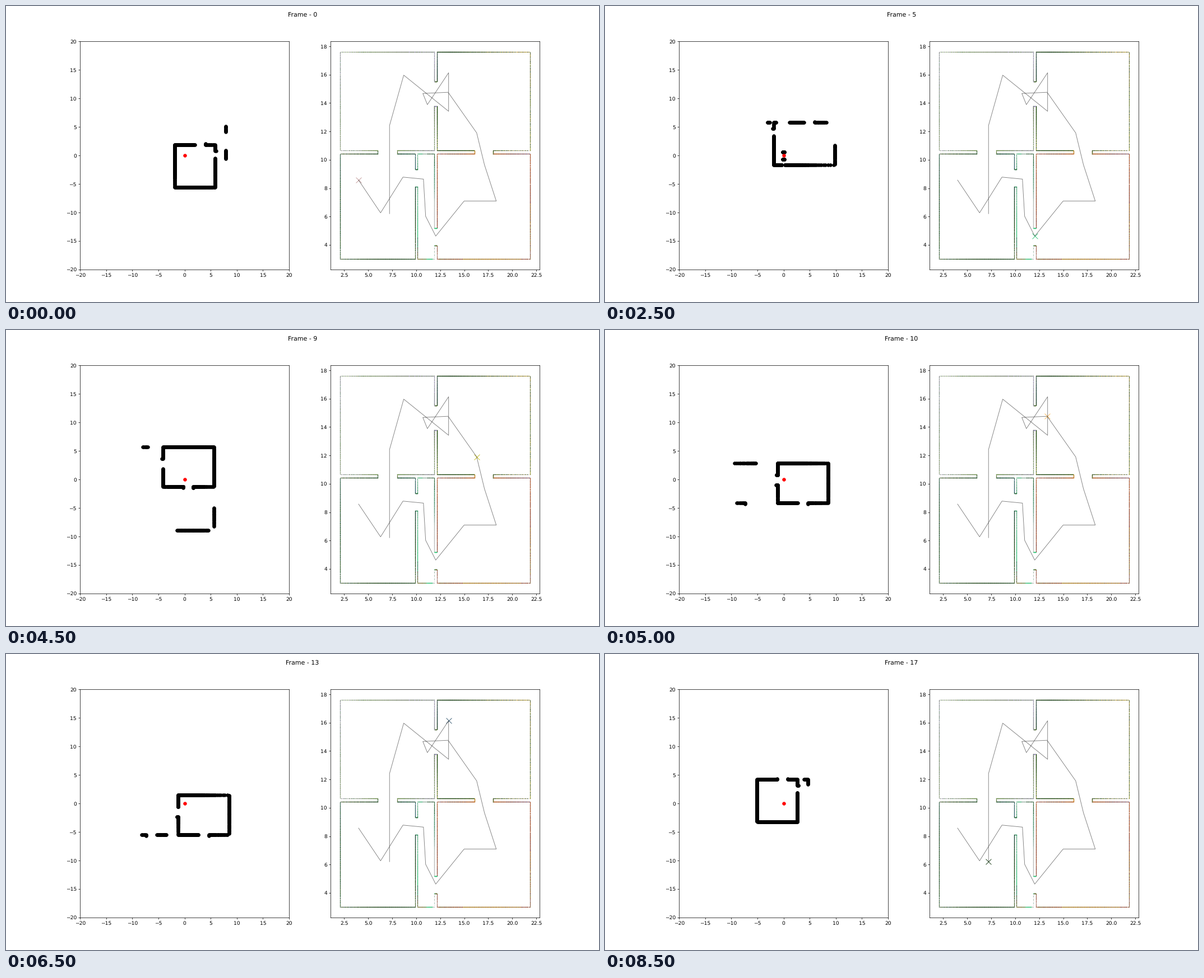
A matplotlib script for the animation above (9000 ms loop, 1058 px wide and 529 px high).

```python
import numpy as np
import matplotlib.pyplot as plt
from matplotlib.animation import FuncAnimation

DPI = 66.125
RAYS = 600
MAX_RANGE = 10
THICK = 0.25
LEFT, RIGHT, BOTTOM, TOP = 2.1, 21.86, 3.0, 17.61
MID = 10.41

# Waypoints of the robot's walk through the rooms
PATH = np.array([
    (4, 8.57), (6.29, 6.26), (8.62, 8.78), (10.75, 8.64), (10.98, 6.02),
    (12.03, 4.62), (14.98, 7.09), (18.33, 7.09), (17.1, 9.65), (16.29, 11.9),
    (13.32, 14.76), (10.69, 14.68), (11.16, 13.89), (13.37, 16.14),
    (13.37, 13.42), (8.7, 15.97), (7.22, 12.41), (7.22, 6.2),
])
COLORS = [
    "rosybrown", "olivedrab", "steelblue", "seagreen", "silver",
    "xkcd:algae green", "sienna", "xkcd:eggplant", "xkcd:rust orange",
    "xkcd:olive yellow", "xkcd:butterscotch", "cadetblue", "dimgray",
    "xkcd:dark slate blue", "xkcd:hunter green", "xkcd:lilac",
    "xkcd:moss green", "xkcd:very dark green",
]


def wall(at, start, end, doors, upright):
    """Split a wall at its doors into blocks of x0, x1, y0, y1."""
    cuts = [start, *np.ravel(doors), end]
    across = (at, at + THICK)
    return [across + span if upright else span + across
            for span in zip(cuts[::2], cuts[1::2])]


BLOCKS = [
    (LEFT, RIGHT, BOTTOM, TOP),
    *wall(MID, LEFT, RIGHT, [(6, 8), (16.05, 17.98)], upright=False),
    *wall(9.88, BOTTOM, MID, [(8.1, 9.33)], upright=True),
    *wall(11.89, BOTTOM, TOP, [(3.97, 5.19), (13.8, 15.53)], upright=True),
]


def scan(pos):
    """Return the points where rays from pos first meet a wall."""
    angle = np.linspace(0, 2 * np.pi, RAYS, endpoint=False)
    px, py = pos
    dx, dy = np.cos(angle), np.sin(angle)
    dist = np.full(RAYS, np.inf)

    def hit(offset, along, start, across, low, high):
        t = offset / along
        q = start + t * across
        return np.where((t > 0) & (q >= low) & (q <= high), t, np.inf)

    with np.errstate(all="ignore"):
        for x0, x1, y0, y1 in BLOCKS:
            for x in (x0, x1):
                dist = np.minimum(dist, hit(x - px, dx, py, dy, y0, y1))
            for y in (y0, y1):
                dist = np.minimum(dist, hit(y - py, dy, px, dx, x0, x1))
    near = dist <= MAX_RANGE
    d = dist[near]
    return np.column_stack((px + d * dx[near], py + d * dy[near]))


scans = [scan(p) for p in PATH]

plt.rcParams["text.hinting"] = "none"
fig, (local, world) = plt.subplots(1, 2, figsize=(1058 / DPI, 529 / DPI), dpi=DPI)
title = fig.suptitle("Frame - 0")

local.set(xlim=(-20, 20), ylim=(-20, 20),
          xticks=range(-20, 21, 5), yticks=range(-20, 21, 5))
hits = local.scatter([], [], c="black")
local.scatter([0], [0], c="red", zorder=3)

world.set(xlim=(1.11, 22.85), ylim=(2.27, 18.34),
          xticks=np.arange(2.5, 23, 2.5), yticks=range(4, 19, 2))
for points, color in zip(scans, COLORS):
    world.scatter(*points.T, color=color, s=0.1)
world.plot(*PATH.T, color="black", alpha=0.5, lw=1)
robot = world.scatter(*PATH[0], marker="x", s=115, lw=0.9, c=COLORS[0])


def update(i):
    title.set_text(f"Frame - {i}")
    hits.set_offsets(scans[i] - PATH[i])
    robot.set_offsets([PATH[i]])
    robot.set_color(COLORS[i])
    return title, hits, robot


anim = FuncAnimation(fig, update, frames=len(PATH), interval=500,
                     repeat=True, repeat_delay=0, blit=False)
plt.show()
```
